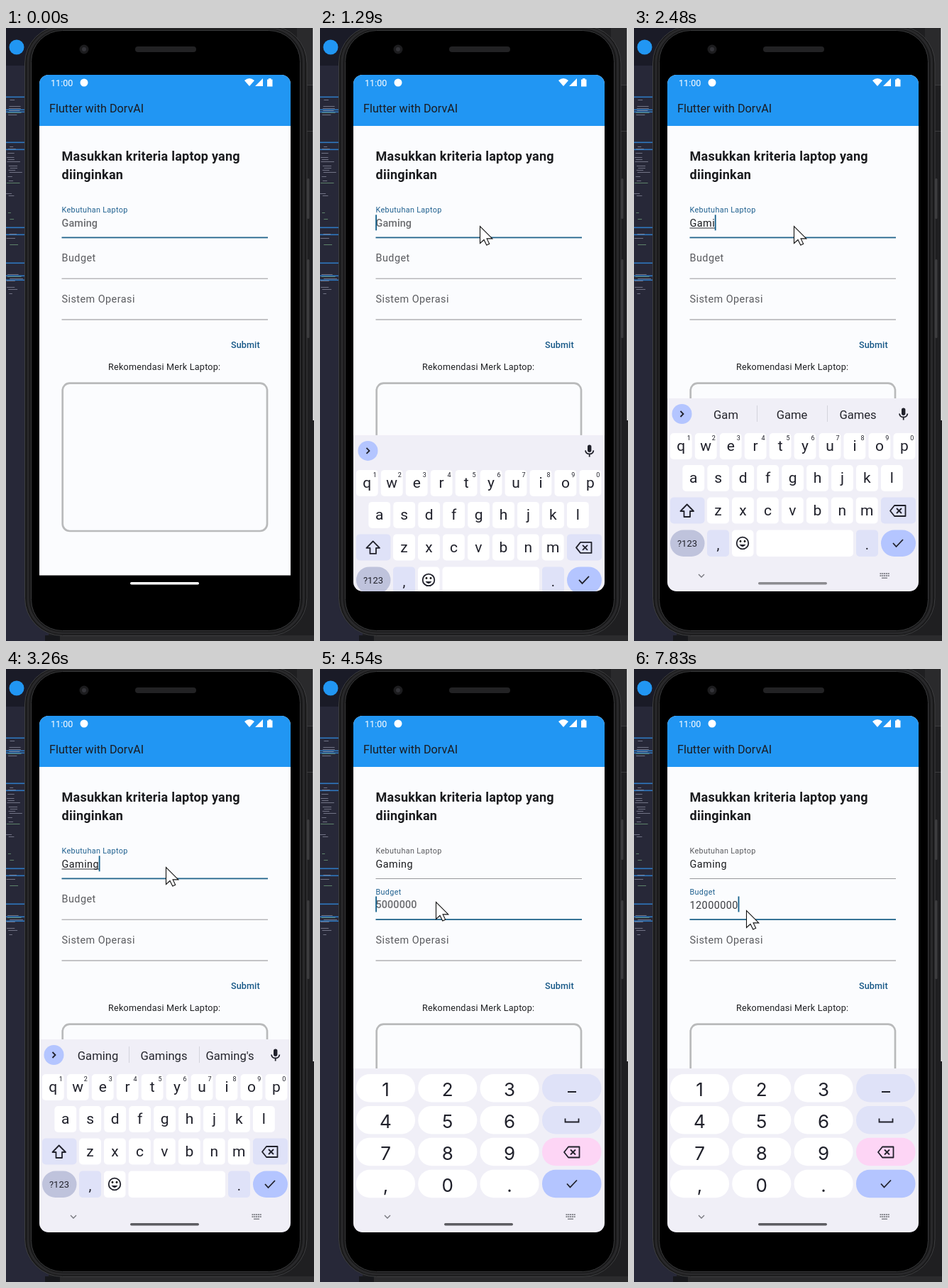
Animation of 434 by 864 pixels, one loop 8 s. Source, as an HTML page:

```html
<!DOCTYPE html>
<html lang="id">
<head>
<meta charset="utf-8">
<title>Laptop form</title>
<style>
html, body { margin: 0; width: 100%; height: 100%; overflow: hidden; background: #1f1f21; }
svg { display: block; width: 434px; height: 864px; font-family: Roboto, "Noto Sans", sans-serif; }
text { white-space: pre; }
.mid { text-anchor: middle; }
.body { font-size: 14.42px; letter-spacing: .45px; }
.hint { font-size: 14.42px; font-weight: 500; letter-spacing: .1px; fill: #6b6c6f; }
.icon { fill: none; stroke: #20212b; stroke-width: 1.8; }
#pads { font-family: Inter, Roboto, sans-serif; }
</style>
</head>
<body>
<svg viewBox="0 0 434 864">
  <defs>
    <clipPath id="screen"><rect x="47" y="66" width="354" height="728" rx="13"/></clipPath>
    <g id="erase" class="icon">
      <path d="M-11 0L-5 -7.500H10.500V7.500H-5Z" stroke-linejoin="round"/>
      <path d="M-2 -3.500L5 3.500M5 -3.500L-2 3.500"/>
    </g>
    <path id="tick" class="icon" d="M-7 0L-2.500 5L7 -5"/>
  </defs>

  <!-- desktop -->
  <rect width="60" height="864" fill="#272838"/>
  <rect width="60" height="53" fill="#1a1b27"/>
  <circle cx="15" cy="27" r="10.500" fill="#2196f3"/>
  <g id="map"></g>
  <rect x="55" y="856" width="21" height="8" fill="#17181c"/>
  <rect x="76" y="856" width="358" height="8" fill="#2b2b2d"/>
  <rect x="410" width="24" height="80" fill="#2a2a2c"/>
  <path d="M424 80.500H434M424 145.500H434" stroke="#3c3c3e"/>
  <rect x="432.500" width="1.500" height="553" fill="#f2f2f2"/>

  <!-- phone -->
  <rect x="424" y="212" width="3.500" height="57" rx="1.500" fill="#3c3c3e"/>
  <rect x="424" y="326" width="3.500" height="111" rx="1.500" fill="#3c3c3e"/>
  <rect x="26.500" y="-3" width="397.500" height="859.500" rx="53" fill="#19191a" stroke="#3e3f41"/>
  <rect x="31" y="0" width="388.500" height="853" rx="49" fill="none" stroke="#29292b" stroke-width="3"/>
  <rect x="35.500" y="3.500" width="379" height="846" rx="44" fill="#000" stroke="#3a3b3d"/>
  <circle cx="110" cy="30" r="6.500" fill="#1c1c1e"/>
  <circle cx="110" cy="30" r="3" fill="#333338"/>
  <rect x="182" y="26" width="86" height="8" rx="4" fill="#222224"/>

  <g clip-path="url(#screen)">
    <rect x="47" y="66" width="354" height="705.500" fill="#fbfcfe"/>
    <rect x="47" y="66" width="354" height="72" fill="#2196f3"/>
    <g fill="#fff">
      <text x="63" y="81.500" font-size="12.600">11:00</text>
      <circle cx="110" cy="77" r="5.500"/>
      <path d="M336 74Q343 68 350 74L343 82ZM351 82L362 71V82ZM368 72.500H370V71H373.500V72.500H375.500V82.500H368Z"/>
    </g>
    <text x="61" y="118.500" font-size="16.220" fill="#1b1c22">Flutter with DorvAI</text>
    <g font-size="18.030" font-weight="700" letter-spacing=".225" fill="#1a1b1e">
      <text x="78.500" y="187">Masukkan kriteria laptop yang</text>
      <text x="78.500" y="212.500">diinginkan</text>
    </g>

    <g class="body">
      <text id="needLabel" transform="translate(78.500 260) scale(.75)">Kebutuhan Laptop</text>
      <text id="budgetLabel">Budget</text>
      <text x="78.500" y="387" fill="#5a5b5f">Sistem Operasi</text>
      <text id="need" x="78.500" y="280" fill="#1b1c1f"></text>
      <text id="budget" x="78.500" y="337.700" fill="#3c3d41"></text>
    </g>
    <text id="needHint" class="hint" x="78.500" y="279.500">Gaming</text>
    <text id="budgetHint" class="hint" x="78.500" y="337.300">5000000</text>
    <rect id="compose" x="78.500" y="281.500" height="1" fill="#2b2c30"/>
    <rect id="needLine" x="78.500" width="290.500"/>
    <rect id="budgetLine" x="78.500" width="290.500"/>
    <rect x="78.500" y="410.500" width="290.500" height="1" fill="#8b8c90"/>
    <rect id="caret" width="1.800" height="22" fill="#125f8b"/>

    <text x="317" y="450.500" font-size="12.620" font-weight="500" letter-spacing=".09" fill="#175887">Submit</text>
    <text x="144" y="481.500" font-size="12.620" letter-spacing=".225" fill="#1f2023">Rekomendasi Merk Laptop:</text>
    <rect x="79.700" y="500.700" width="288.300" height="208.300" rx="10" fill="none" stroke="#b9babb" stroke-width="2.700"/>

    <g id="board">
      <g id="letters">
        <rect x="47" y="522" width="354" height="272" fill="#f0eff7"/>
        <circle cx="67.500" cy="544" r="14" fill="#b4c5ff"/>
        <path class="icon" d="M65.500 540L69.500 544L65.500 548"/>
        <path id="bars" d="M173.500 532V555M272.500 532V555" stroke="#d3d3dc"/>
        <g id="words" class="mid" fill="#25262d"></g>
        <rect x="377" y="535.500" width="5.400" height="10.500" rx="2.700" fill="#20212b"/>
        <path class="icon" d="M374 543.500Q374.500 548.500 379.700 548.500T385.400 543.500M379.700 548.500V552.500" stroke-width="1.600"/>
        <g id="keys" class="mid" fill="#20212b"></g>
        <path class="icon" d="M74.700 671.500L84 681H79V689H70.500V681H65.500Z" stroke-linejoin="round"/>
        <use href="#erase" x="372" y="680.500"/>
        <use href="#tick" x="372" y="726"/>
        <circle class="icon" cx="153" cy="726" r="8.300"/>
        <circle cx="150" cy="723.500" r="1.400"/><circle cx="156" cy="723.500" r="1.400"/>
        <path d="M148.500 728H157.500Q153 734.500 148.500 728Z" fill="#20212b"/>
      </g>
      <g id="digits">
        <rect x="47" y="563" width="354" height="231" fill="#f0eff7"/>
        <g id="pads" class="mid" fill="#20212b"></g>
        <path class="icon" d="M349 596H361M345.500 633.500V638.500H364.500V633.500"/>
        <use href="#erase" x="355" y="681"/>
        <use href="#tick" x="355" y="725.500"/>
      </g>
      <path d="M91 770L95 774L99 770" fill="none" stroke="#74757c" stroke-width="1.300"/>
      <path d="M346.500 769H360M346.500 772H360" stroke="#85868d" stroke-width="2" stroke-dasharray="2 .8"/>
      <path d="M349 775.300H357" stroke="#85868d" stroke-width="1.500"/>
    </g>
  </g>
  <rect id="handle" x="175" y="781" width="97" height="3.400" rx="1.700"/>
  <path id="mouse" d="M0 0V24L5.500 19L9.300 26.500L13.200 24.700L9.600 17.400H17.300Z" fill="#fff" stroke="#111" stroke-width="1.100"/>
</svg>
<script>
const $ = id => document.getElementById(id);
const rect = (x, y, w, h, fill, r = 0) =>
  `<rect x="${x}" y="${y}" width="${w}" height="${h}" rx="${r}" fill="${fill}"/>`;
const label = (x, y, s, size) => `<text x="${x}" y="${y}" font-size="${size}">${s}</text>`;

// code overview on the left edge
let seed = 7;
const rnd = () => (seed = seed * 16807 % 2147483647) / 2147483647;
let map = [97, 115, 118, 161, 171, 281, 291, 331, 349, 355]
  .map(y => rect(0, y - 0.5, 26, 1.6, '#2f78c0')).join('');
for (let y = 101; y < 376; y += 3) {
  const dense = (y > 165 && y < 238) || (y > 107 && y < 120) || y > 345;
  if (rnd() < (dense ? 0.75 : 0.15))
    map += rect(rnd() * 6, y, 4 + rnd() * (dense ? 16 : 9), 0.8, rnd() < 0.8 ? '#85889a' : '#6d9a78');
}
$('map').innerHTML = map;

// letter keyboard
const PALE = '#dfe2f8', BLUE = '#b4c5ff', PITCH = 34.95;
let keys = '';
[['qwertyuiop', 66.3, 571, 596], ['asdfghjkl', 83.8, 616, 641], ['zxcvbnm', 118.5, 661.5, 687]]
  .forEach(([row, x0, top, base], r) => [...row].forEach((c, i) => {
    const x = x0 + i * PITCH;
    keys += rect(x - 15.4, top, 30.8, 37, '#fff', 5) + label(x, base, c, 21);
    if (!r) keys += label(x + 11, 581, (i + 1) % 10, 9);
  }));
keys += rect(51, 661.5, 48.5, 37, PALE, 5) + rect(348, 661.5, 49, 37, PALE, 5)
  + rect(51, 707.5, 48.5, 37.5, '#bfc3dc', 18.7) + label(75, 731, '?123', 13)
  + rect(103, 707.5, 31, 37.5, PALE, 5) + label(118.5, 735, ',', 20)
  + rect(138, 707.5, 30.5, 37.5, '#fff', 5) + rect(172.5, 707.5, 136.5, 37.5, '#fff', 5)
  + rect(313, 707.5, 31, 37.5, PALE, 5) + label(328.5, 735, '.', 20)
  + rect(348, 707.5, 49, 37.5, BLUE, 18.7);
$('keys').innerHTML = keys;

// number keyboard
let pads = '';
['123', '456', '789', ',0.'].forEach((row, r) => {
  const y = 571 + r * 44.9;
  [...row].forEach((c, i) => {
    const x = 51 + i * 87.3;
    pads += rect(x, y, 83, 39.5, '#fff', 19) + label(x + 41.5, y + 31, c, 26);
  });
  pads += rect(313, y, 83.5, 39.5, [PALE, PALE, '#fdd5f5', BLUE][r], 19);
});
$('pads').innerHTML = pads;

const LOOP = 8000, SHOW = 1150, FOCUS = 4060, SWAP = 4330;
const needTimes = [1780, 1990, 2200, 2410, 2830, 3040];
const budgetTimes = [5820, 6220, 6550, 6810, 7010, 7410, 7610, 7830];
const suggestions = [
  [0, ''], [1780, 'G Good Get'], [2270, 'Ga Game Gas'], [2480, 'Gam Game Games'],
  [2690, 'Gami Gaming Games'], [2900, 'Gamin Gaming Gamine'], [3260, "Gaming Gamings Gaming's"]
];
const blinks = [[200, 680], [SHOW, 3460], [3590, 3920], [FOCUS, 4830], [5290, LOOP]];
const path = [
  [70, 380, 758], [200, 335, 590], [330, 268, 370], [480, 231, 243], [680, 226, 261],
  [830, 225, 279], [3430, 225, 279], [3720, 222, 361], [3900, 222, 361],
  [FOCUS, 163, 328], [4600, 163, 328], [4680, 158, 340]
];

const clamp = v => Math.max(0, Math.min(1, v));
const set = (id, attrs) => { for (const k in attrs) $(id).setAttribute(k, attrs[k]); };
const show = (id, on) => set(id, { visibility: on ? 'visible' : 'hidden' });
const typed = (s, times, t) => s.slice(0, times.filter(v => v <= t).length);
const widthOf = id => $(id).textContent ? $(id).getComputedTextLength() : 0;

function mouseAt(t) {
  const i = path.findIndex(p => p[0] > t);
  if (i < 0) return path[path.length - 1].slice(1);
  const [a, x, y] = path[Math.max(0, i - 1)], [b, x2, y2] = path[i];
  const k = clamp((t - a) / (b - a));
  return [x + (x2 - x) * k, y + (y2 - y) * k];
}

function line(id, y, active) {
  set(id, active ? { y: y - 0.5, height: 1.8, fill: '#22658c' } : { y, height: 1, fill: '#97989b' });
}

function draw(t) {
  const onBudget = t >= FOCUS;
  $('need').textContent = typed('Gaming', needTimes, t);
  $('budget').textContent = typed('12000000', budgetTimes, t);
  const needWidth = widthOf('need'), budgetWidth = widthOf('budget');

  set('needLabel', { fill: onBudget ? '#5a5b5f' : '#1f608f' });
  const k = 1 - (1 - clamp((t - FOCUS) / 170)) ** 2;
  set('budgetLabel', {
    fill: onBudget ? '#1f608f' : '#5a5b5f',
    transform: `translate(78.5 ${329 - 11 * k}) scale(${1 - 0.25 * k})`
  });
  set('needHint', { opacity: t < 1775 ? 1 : t < 1850 ? 0.6 : 0 });
  set('budgetHint', { opacity: t < 5820 ? clamp((t - FOCUS - 60) / 150) : t < 5890 ? 0.6 : 0 });
  set('compose', { width: onBudget ? 0 : needWidth });
  line('needLine', 295, !onBudget);
  line('budgetLine', 352.7, onBudget);

  set('caret', onBudget ? { x: 78.2 + budgetWidth, y: 320.5 } : { x: 78.2 + needWidth, y: 263.3 });
  show('caret', blinks.some(([a, b]) => t >= a && t < b));

  const rise = 1 - (1 - clamp((t - SHOW) / 340)) ** 3;
  set('board', { transform: `translate(0 ${275 * (1 - rise)})` });
  show('board', t >= SHOW);
  set('letters', { display: t < SWAP ? 'inline' : 'none' });
  set('digits', { display: t < SWAP ? 'none' : 'inline' });
  set('handle', { fill: t < 1630 ? '#fff' : t < 2690 ? '#8b8b90' : '#5d5d62' });

  const words = suggestions.filter(s => s[0] <= t).pop()[1];
  set('bars', { opacity: words ? 1 : 0 });
  $('words').innerHTML = words.split(' ').map((w, i) => label([129.5, 222.5, 315.5][i], 550.5, w, 16.6)).join('');

  const [x, y] = mouseAt(t);
  set('mouse', { transform: `translate(${x + 0.5} ${y + 0.5})` });
  show('mouse', t >= 70);
}

const start = performance.now();
function tick() {
  draw((performance.now() - start + 4) % LOOP);
  requestAnimationFrame(tick);
}
tick();
</script>
</body>
</html>
```
